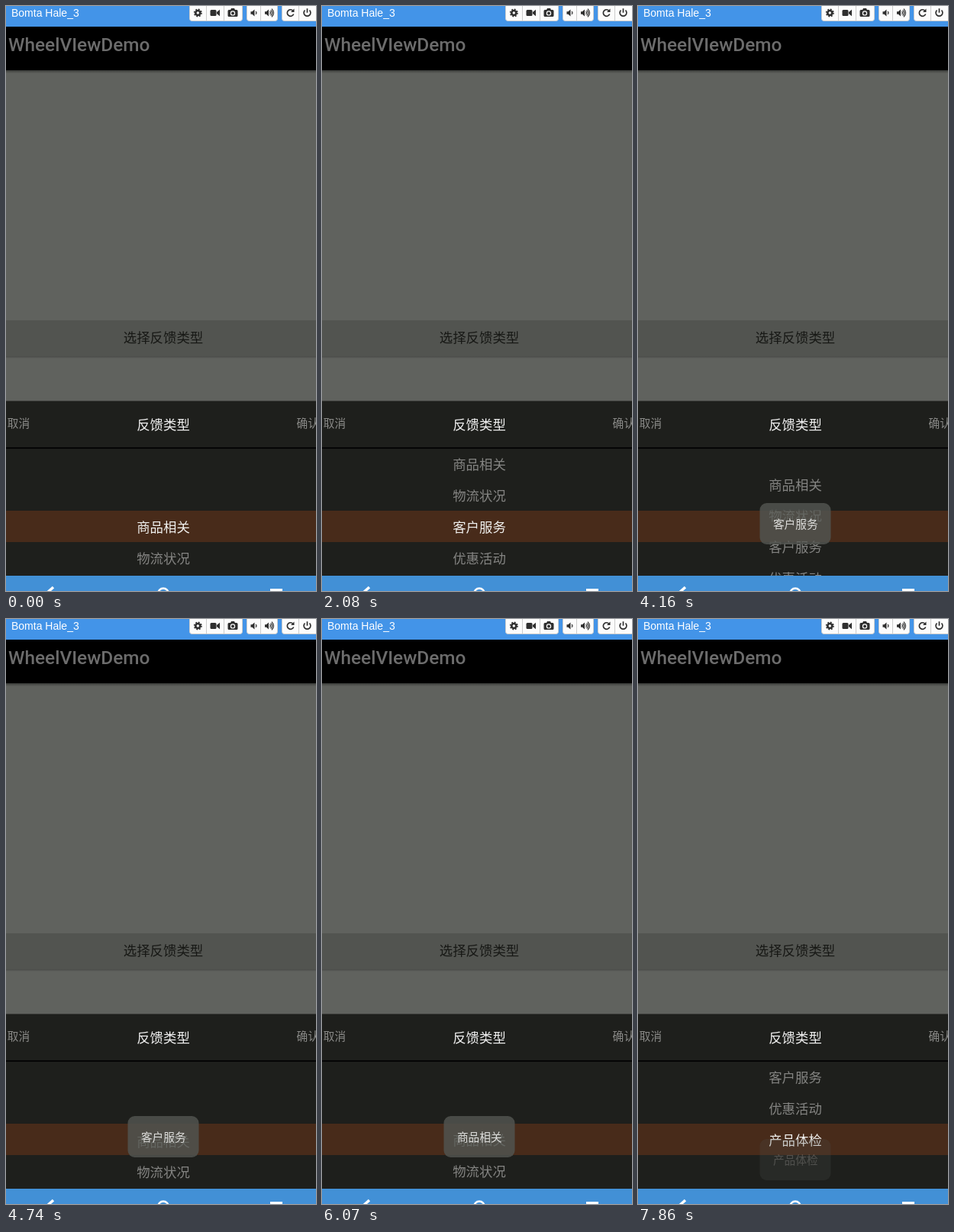
Animation of 406 by 765 pixels, one loop 8 s. Source, as an HTML page:

```html
<!DOCTYPE html>
<html lang="zh-CN">
<head>
<meta charset="utf-8">
<title>WheelVIewDemo</title>
<style>
  html, body { margin: 0; width: 100%; height: 100%; overflow: hidden; background: #60625e; }
  svg { display: block; width: 406px; height: 765px; }
  text { font-family: "Noto Sans CJK SC", "Noto Sans CJK", sans-serif; }
  .mid { font-size: 17.4px; text-anchor: middle; }
  .small { font-size: 14.7px; }
  .app { font: 500 24.4px Roboto, sans-serif; }
  .device { font: 14px "Liberation Sans", Arial, sans-serif; }

  .wheel, .toast, .toast text { animation: 8s step-end infinite; }
  .wheel { animation-name: wheel; }
  .toast { animation-name: toast; }
  .toast text { text-anchor: middle; opacity: 0; }
  .toast .t1 { animation-name: first; }
  .toast .t2 { animation-name: second; }
  .toast .t3 { animation-name: third; }

  /* one row is 40.8px */
  @keyframes wheel {
    0% { transform: translateY(0); }
    7.375% { transform: translateY(-171px); }
    9.25% { transform: translateY(-163.2px); }
    18.5% { transform: translateY(-161.6px); }
    20.375% { transform: translateY(-130.5px); }
    22.25% { transform: translateY(-102px); }
    26% { transform: translateY(-81.6px); }
    52% { transform: translateY(-55.5px); }
    53.875% { transform: translateY(-22px); }
    55.75% { transform: translateY(4px); }
    57.5% { transform: translateY(1.5px); }
    59.375% { transform: translateY(0); }
    81.5% { transform: translateY(-29px); }
    83.375% { transform: translateY(-162px); }
    85.25% { transform: translateY(-167px); }
    87%, 100% { transform: translateY(-163.2px); }
  }
  @keyframes toast {
    0% { transform: translateY(30px); opacity: 0; }
    37.125% { transform: translateY(-5px); opacity: .9; }
    39% { transform: translateY(-2px); opacity: 1; }
    40.875% { transform: translateY(0); opacity: 1; }
    61.25% { transform: translateY(10px); opacity: .6; }
    63% { transform: translateY(30px); opacity: 0; }
    70.375% { transform: translateY(30px); opacity: .27; }
    72.25% { transform: translateY(-8px); opacity: .9; }
    74.125% { transform: translateY(-2px); opacity: 1; }
    75.875% { transform: translateY(0); opacity: 1; }
    94.5% { transform: translateY(10px); opacity: .6; }
    96.375% { transform: translateY(30px); opacity: 0; }
    98.25%, 100% { transform: translateY(30px); opacity: .27; }
  }
  @keyframes first { 0% { opacity: 1; } 66%, 100% { opacity: 0; } }
  @keyframes second { 0% { opacity: 0; } 66% { opacity: 1; } 97%, 100% { opacity: 0; } }
  @keyframes third { 0% { opacity: 0; } 97%, 100% { opacity: 1; } }
</style>
</head>
<body>
<svg viewBox="0 0 406 765">
  <defs>
    <linearGradient id="fade" x2="0" y2="1">
      <stop offset="0" stop-color="#000" stop-opacity=".4"/>
      <stop offset="1" stop-color="#000" stop-opacity="0"/>
    </linearGradient>
    <clipPath id="outer"><path d="M0 579H406V660H0ZM0 701H406V745H0Z"/></clipPath>
    <clipPath id="band"><path d="M0 660H406V701H0Z"/></clipPath>
    <g id="rows" class="mid">
      <text x="206" y="688">商品相关</text>
      <text x="206" y="728.8">物流状况</text>
      <text x="206" y="769.6">客户服务</text>
      <text x="206" y="810.4">优惠活动</text>
      <text x="206" y="851.2">产品体检</text>
    </g>
  </defs>

  <!-- page -->
  <rect width="406" height="765" fill="#60625e"/>
  <rect y="84" width="406" height="4" fill="url(#fade)"/>
  <rect y="27" width="406" height="57"/>
  <text class="app" x="3" y="59" fill="#6c6c6c">WheelVIewDemo</text>
  <rect y="458" width="406" height="3" fill="url(#fade)" opacity=".6"/>
  <rect y="411" width="406" height="47" fill="#525450"/>
  <text class="mid" x="206" y="440.2" fill="#171815">选择反馈类型</text>

  <!-- window bar -->
  <rect width="406" height="27" fill="#4394e8"/>
  <text class="device" x="7" y="14" fill="#fff">Bomta Hale_3</text>
  <g fill="#fcfcfc" stroke="#ccc">
    <rect x="240.5" y="-6" width="69" height="25.5" rx="3"/>
    <rect x="315.5" y="-6" width="40" height="25.5" rx="3"/>
    <rect x="361.5" y="-6" width="50" height="25.5" rx="3"/>
    <path d="M262.5 0V19M285.5 0V19M333.5 0V19M383.5 0V19"/>
  </g>
  <g fill="#2f2f2f">
    <circle cx="251.3" cy="9" r="3" fill="none" stroke="#2f2f2f" stroke-width="2.6"/>
    <circle cx="251.3" cy="9" r="4.7" fill="none" stroke="#2f2f2f" stroke-width="1.6" stroke-dasharray="1.85 1.84"/>
    <rect x="267.5" y="5" width="8" height="8" rx="1.5"/>
    <path d="M276 8L280 4.8V13.2L276 10Z"/>
    <path fill-rule="evenodd" d="M292 5H294L295 3H299L300 5H302Q303.500 5 303.500 6.500V12.500Q303.500 14 302 14H292Q290.500 14 290.500 12.500V6.500Q290.500 5 292 5ZM297 6.200A3.200 3.200 0 1 0 297 12.600A3.200 3.200 0 1 0 297 6.200Z"/>
    <circle cx="297" cy="9.400" r="2"/>
    <path id="horn" d="M320.500 7.300H322.500L325.500 4.500V13.500L322.500 10.700H320.500Z"/>
    <use href="#horn" x="18.500"/>
  </g>
  <g fill="none" stroke="#2f2f2f" stroke-width="1.2">
    <path d="M327 7.300Q329 9 327 10.700M345.500 7.300Q347.500 9 345.500 10.700M346.700 5.500Q350.500 9 346.700 12.500M348 3.700Q353 9 348 14.300"/>
    <path stroke-width="1.700" d="M375.700 6A4.300 4.300 0 1 0 376.700 10.500M391.500 5.500A4.400 4.400 0 1 0 397.500 5.500M394.500 3.300V8.700"/>
    <path fill="#2f2f2f" stroke="none" d="M377.500 3.500V8H373Z"/>
  </g>

  <!-- picker sheet -->
  <rect y="516.5" width="406" height="229" fill="#1e1f1c"/>
  <rect y="577" width="406" height="2" fill="#050505"/>
  <text class="small" x="1.700" y="551" fill="#8a8a88">取消</text>
  <text class="mid" x="206" y="553.600" fill="#f2f2f2">反馈类型</text>
  <text class="small" x="380.500" y="551" fill="#8a8a88">确认</text>
  <rect y="660" width="406" height="41" fill="#482b1a"/>
  <g clip-path="url(#outer)"><use class="wheel" href="#rows" fill="#848482"/></g>
  <g clip-path="url(#band)"><use class="wheel" href="#rows" fill="#f0f0ee"/></g>

  <g class="toast">
    <rect x="159.500" y="650" width="93" height="54" rx="9" fill="#50524e" fill-opacity=".88"/>
    <g class="small" fill="#dcdcda">
      <text class="t1" x="206.300" y="683">客户服务</text>
      <text class="t2" x="206.300" y="683">商品相关</text>
      <text class="t3" x="206.300" y="683">产品体检</text>
    </g>
  </g>

  <!-- navigation bar -->
  <rect y="745" width="406" height="20" fill="#4290d6"/>
  <g fill="none" stroke="#fff">
    <path stroke-width="3.500" d="M62 760L53 768L62 776"/>
    <circle cx="206" cy="768.500" r="7" stroke-width="2.500"/>
    <path stroke-width="3" d="M346 763.500H362"/>
  </g>
</svg>
</body>
</html>
```
